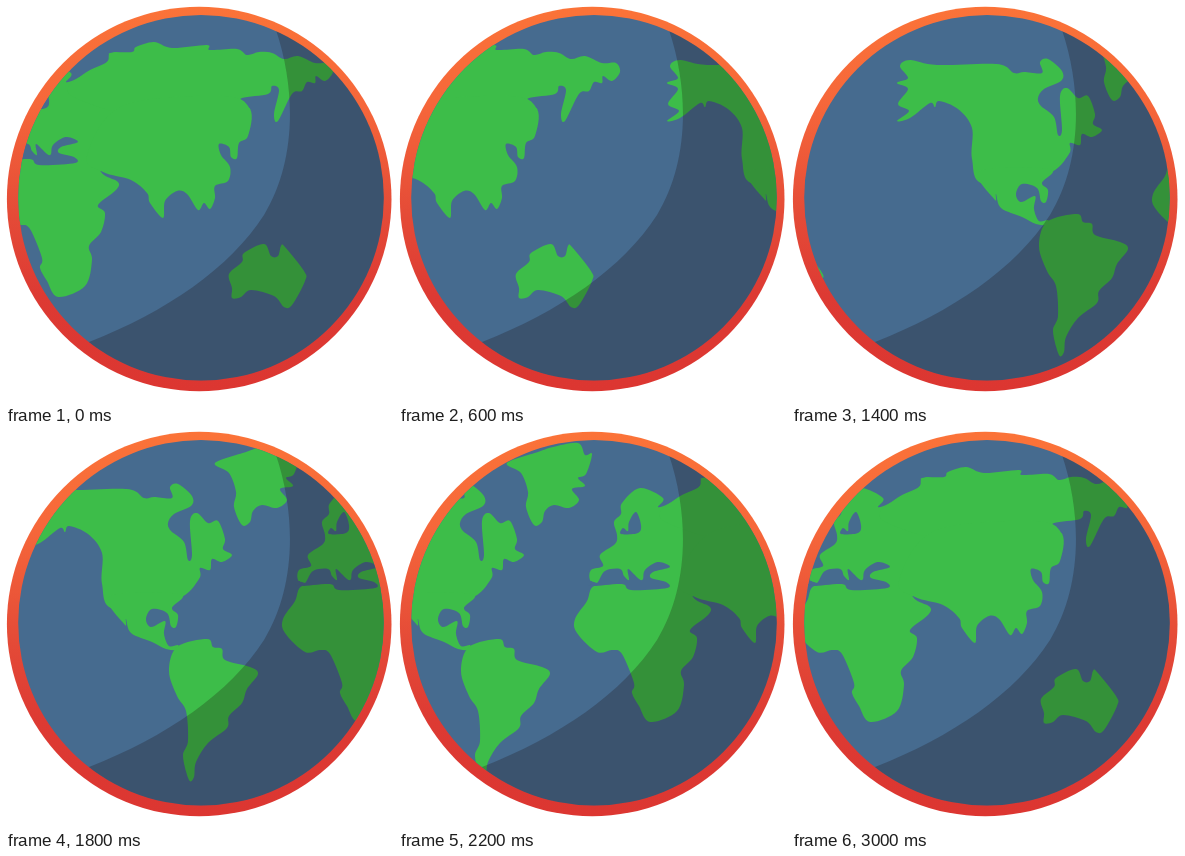
An HTML page that plays this animation: 387x397 px, repeating every 3100 ms.

```html
<!DOCTYPE html>
<html lang="en">
<head>
<meta charset="utf-8">
<title>Spinning globe</title>
<style>
  html, body { margin: 0; width: 100%; height: 100%; overflow: hidden; background: #fff; }
  svg { display: block; width: 387px; height: 397px; }
  .land { fill: #3dbd49; }
  .sea { fill: #466b8f; }
  .shade { fill: rgb(25 12 10 / .24); }
  #spin { animation: spin 3100ms infinite; }
  @keyframes spin {
    0%      { transform: translateX(0); animation-timing-function: steps(6); }
    19.354% { transform: translateX(-106px); animation-timing-function: steps(6); }
    38.709% { transform: translateX(-238px); animation-timing-function: steps(2); }
    45.161% { transform: translateX(-269px); animation-timing-function: steps(4); }
    58.064% { transform: translateX(-353px); animation-timing-function: steps(4); }
    70.967% { transform: translateX(-454px); animation-timing-function: steps(4); }
    83.870% { transform: translateX(-545px); animation-timing-function: steps(4); }
    96.774% { transform: translateX(-627px); animation-timing-function: steps(1); }
    100%    { transform: translateX(-653px); }
  }
</style>
</head>
<body>
<svg viewBox="0 0 387 397">
  <defs>
    <linearGradient id="rim" x1="0" y1="0" x2="0" y2="1">
      <stop offset="0" stop-color="#fb7338"/>
      <stop offset=".25" stop-color="#f6673a"/>
      <stop offset=".55" stop-color="#e44a37"/>
      <stop offset=".75" stop-color="#dd3a33"/>
      <stop offset="1" stop-color="#dc3631"/>
    </linearGradient>
    <clipPath id="disc"><circle cx="195" cy="191.8" r="182.8"/></clipPath>
  </defs>
  <circle cx="193.2" cy="193" r="192.3" fill="url(#rim)"/>
  <g clip-path="url(#disc)">
    <rect class="sea" width="387" height="397"/>
    <g id="spin">
      <g id="map"></g>
      <use href="#map" x="653"/>
    </g>
    <path class="shade" d="M270 24C292 90 288 160 258 209C224 262 160 306 83 336V397H387V0H262Z"/>
  </g>
</svg>
<script>
const map = document.getElementById('map');

// Closed Catmull-Rom curve through "x,y x,y ..." points, moved right by dx
function blob(kind, dx, text) {
  const pts = text.trim().split(/\s+/).map(p => p.split(',').map(Number));
  const n = pts.length;
  const at = i => pts[(i + n) % n];
  const ctrl = (i, side) => [0, 1].map(k => at(i)[k] + side * (at(i + 1)[k] - at(i - 1)[k]) / 6);
  let d = 'M' + pts[0];
  for (let i = 0; i < n; i++) d += `C${ctrl(i, 1)} ${ctrl(i + 1, -1)} ${at(i + 1)}`;
  const path = document.createElementNS('http://www.w3.org/2000/svg', 'path');
  path.setAttribute('class', kind);
  path.setAttribute('d', d + 'Z');
  path.setAttribute('transform', `translate(${dx})`);
  map.append(path);
}

// Europe
blob('land', -108, `107,152 100,149 101,139 113,135 110,124 125,113 127,104 124,91 131,83
  132,72 150,57 173,67 168,76 178,73 192,64 209,56 212,48 226,50 262,90 250,155 206,165 130,160`);
// Africa and Arabia
blob('land', -108, `104,155 130,155 150,159 190,155 206,169 220,176 218,184 200,199 207,207
  203,226 191,240 194,254 187,280 160,291 149,275 142,262 144,252 132,223 122,219 107,221
  87,202 85,188 97,170`);
// Northern Asia
blob('land', 106, `-40,90 -5,56 -2,47 20,46 24,41 42,36 60,42 95,39 98,44 125,43 135,49
  147,46 160,47 172,53 186,50 203,57 217,57 221,66 213,75 204,70 203,77 195,76 190,85 180,88
  166,115 162,108 167,84 160,80 156,88 130,92 127,99 138,105 110,130`);
// Southern Asia
blob('land', 106, `10,100 110,90 138,103 136,130 127,137 125,152 119,151 117,141 107,138
  109,149 118,161 116,175 103,180 103,192 98,203 92,197 86,204 75,188 65,185 53,195 51,212
  38,197 35,187 19,174 -9,166 -25,150`);
// Mediterranean and Black Sea
blob('sea', -108, `98,153 107,152 115,140 130,138 134,145 139,149 138,138 149,148 153,148
  155,139 168,131 180,136 163,141 161,147 176,151 177,157 141,159 132,153 103,155`);
// Baltic
blob('sea', -108, `131,103 133,97 138,100 139,91 146,81 151,94 148,102`);
// North America
blob('land', 269, `108,60 118,54 145,59 205,58 222,67 232,66 250,67 248,56 256,53 270,65
  269,75 252,83 246,92 249,100 262,111 266,129 270,124 268,90 275,82 286,92 296,90 303,108
  301,118 310,124 300,131 290,128 288,139 278,137 277,148 255,168 192,178 180,153 180,122
  166,103 147,95 143,101 138,97 118,112 105,115 117,105 106,98 116,83 105,77 116,72`);
// Central America
blob('land', 269, `188,165 258,163 250,177 256,184 254,196 249,195 245,182 230,178 224,188
  229,196 243,190 242,203 247,215 256,214 256,219 244,218 230,211 209,202 204,188 203,194`);
// South America
blob('land', 269, `247,240 255,216 285,208 291,216 300,218 303,229 328,236 336,243 325,258
  320,272 307,285 305,297 286,312 274,331 272,346 267,349 261,325 266,310 264,280 255,265`);
// Greenland
blob('land', 454, `108,32 139,21 154,16 179,12 186,24 193,23 187,43 179,47 186,55 173,58
  180,69 170,77 155,74 146,80 143,91 135,94 127,76 129,61 122,42`);
// Australia
blob('land', 0, `223,268 236,256 238,247 258,238 265,250 272,250 275,240 279,241 298,265
  299,275 286,299 278,301 268,290 245,284 235,291 226,292 226,282`);
</script>
</body>
</html>
```
